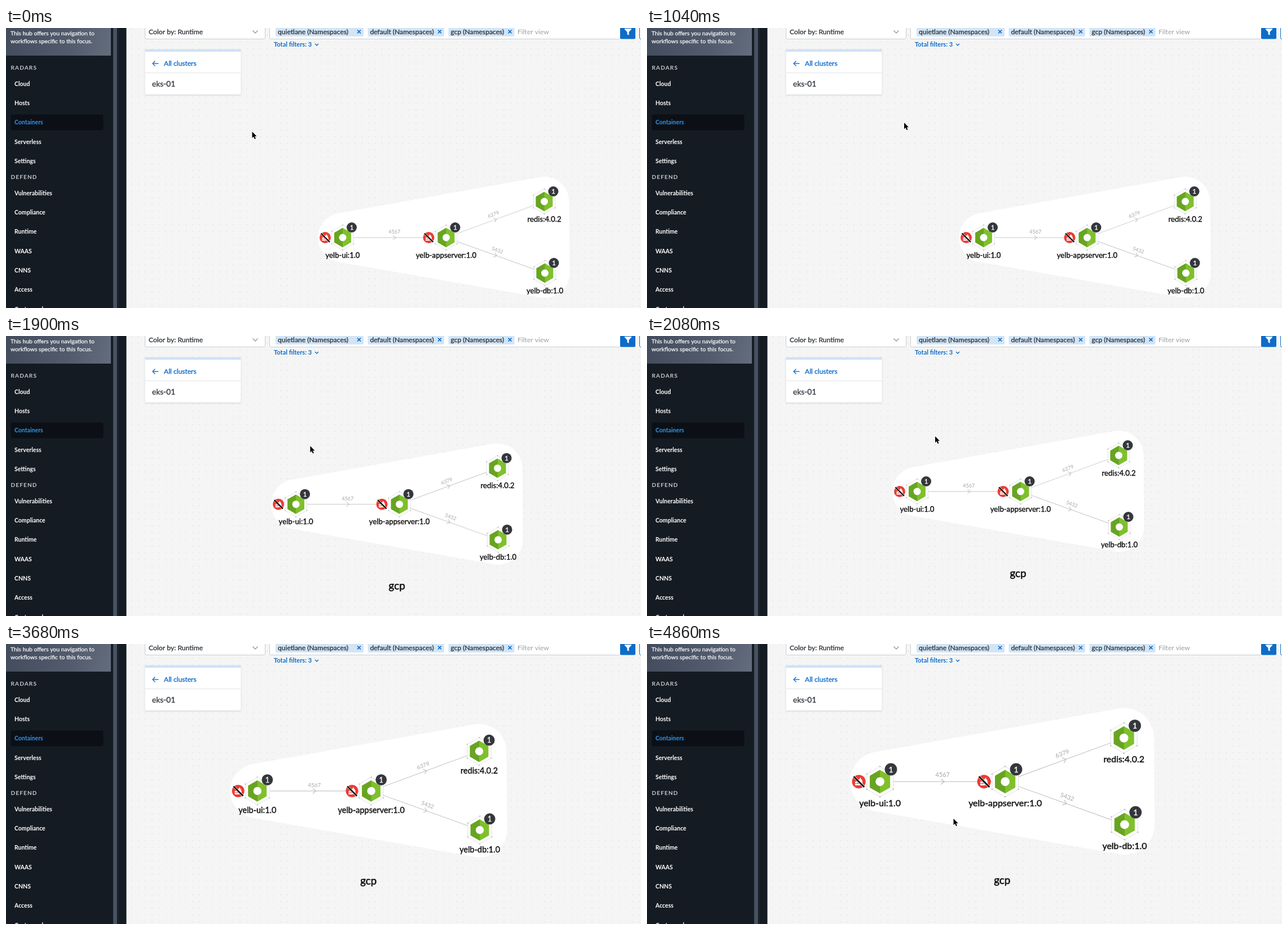
Write an HTML page with a canvas that moves like this. It is 1126x497 px and loops after 4.88 s.

```html
<!DOCTYPE html>
<html lang="en">
<head>
<meta charset="utf-8">
<title>Container radar</title>
<style>
  html, body { margin: 0; width: 100%; height: 100%; overflow: hidden; }
  canvas {
    display: block;
    background: radial-gradient(circle at 6px 6px, #e8eaea .8px, transparent 1.2px) 1px 7px / 12px 12px #f4f5f4;
  }
</style>
</head>
<body>
<canvas id="stage" width="1126" height="497"></canvas>
<script>
const ctx = document.getElementById('stage').getContext('2d');
const LOOP = 4880, TICK = 57.8;
const BLUE = '#0d6cc9';
const MEDIUM = 500;
ctx.lineJoin = 'round';

const linear = p => p;
const smooth = p => p * p * (3 - 2 * p);
const out = p => 1 - (1 - p) ** 2;

// Keys: [tick, x, y, easing into this key]
const cursorKeys = [
  [0, 436.5, 184], [9, 658, 201, smooth], [10, 658, 201], [18, 456, 168, smooth],
  [20, 466, 175], [25, 628, 274, smooth], [28, 628, 274], [29, 602, 243],
  [30, 575, 217], [36, 511, 178, out], [37, 508, 178], [39, 508, 178],
  [43, 1111, 448, smooth], [76, 921, 448], [84, 543.5, 310, out],
];
const dragKeys = [
  [28, 0, 0], [29, -14, -20], [30, -39, -45], [36, -118, -96, out], [37, -121.5, -96],
];

function at(keys, tick) {
  const i = keys.findIndex(k => k[0] > tick);
  if (i === 0) return keys[0].slice(1, 3);
  if (i < 0) return keys[keys.length - 1].slice(1, 3);
  const [t0, x0, y0] = keys[i - 1], [t1, x1, y1, ease = linear] = keys[i];
  const p = ease((tick - t0) / (t1 - t0));
  return [x0 + (x1 - x0) * p, y0 + (y1 - y0) * p];
}

// y is the middle of the capitals; the medium weight is regular with a thin outline
function text(str, x, y, size, color, weight = 400, align = 'left', spacing = 0) {
  ctx.font = `${weight === MEDIUM ? 400 : weight} ${size}px Lato, sans-serif`;
  ctx.fillStyle = ctx.strokeStyle = color;
  ctx.textAlign = align;
  ctx.letterSpacing = spacing + 'px';
  const baseline = y + size * .36;
  ctx.fillText(str, x, baseline);
  if (weight === MEDIUM) {
    ctx.lineWidth = size * .03;
    ctx.strokeText(str, x, baseline);
  }
}

function rect(x, y, w, h, fill, border, radius = 0) {
  ctx.beginPath();
  ctx.roundRect(x, y, w, h, radius);
  ctx.fillStyle = fill;
  ctx.fill();
  if (border) stroke(border, 1);
}

function stroke(color, width) {
  ctx.strokeStyle = color;
  ctx.lineWidth = width;
  ctx.stroke();
}

function line(points, color, width = 1) {
  ctx.beginPath();
  points.forEach(p => ctx.lineTo(...p));
  stroke(color, width);
}

function disc(x, y, r, color) {
  ctx.beginPath();
  ctx.arc(x, y, r, 0, Math.PI * 2);
  ctx.fillStyle = color;
  ctx.fill();
}

function polygon(points, color) {
  ctx.beginPath();
  points.forEach(p => ctx.lineTo(...p));
  ctx.closePath();
  ctx.fillStyle = color;
  ctx.fill();
}

function drawSidebar() {
  rect(0, 0, 213.5, 497, '#151b23');
  rect(190, 0, 7, 497, '#465262');
  rect(199, 0, 1, 497, '#232b35');
  const sky = ctx.createLinearGradient(0, 0, 186, 49);
  sky.addColorStop(0, '#434c5d');
  sky.addColorStop(.6, '#525b6c');
  sky.addColorStop(1, '#646d7d');
  rect(0, 0, 186, 49, sky);
  text('This hub offers you navigation to', 8, 9.6, 10.35, '#f0f2f4', MEDIUM);
  text('workflows specific to this focus.', 8, 23.6, 10.35, '#f0f2f4', MEDIUM);

  rect(8.5, 153.5, 164, 28, '#0c1016', null, 3);
  const section = (title, y, items) => {
    text(title, 8.5, y, 10.1, '#c3c7cb', 700, 'left', 1.1);
    items.forEach((item, i) =>
      text(item, 15, y + 28.5 + i * 34.3, 10.5, item === 'Containers' ? '#3095ee' : '#fff', 700));
  };
  section('RADARS', 70.5, ['Cloud', 'Hosts', 'Containers', 'Serverless', 'Settings']);
  section('DEFEND', 264.5, ['Vulnerabilities', 'Compliance', 'Runtime', 'WAAS', 'CNNS', 'Access', 'Custom rules']);
}

function drawHeader() {
  rect(246.5, -9.5, 213, 29, '#fff', '#c9cdd1', 2);
  text('Color by: Runtime', 253, 6.5, 12.2, '#33383e', MEDIUM);
  line([[437.5, 4.5], [442, 9], [446.5, 4.5]], '#8d9298', 1.3);

  rect(467.5, -9.5, 622, 29, '#fff', '#c9cdd1', 2);
  const chip = (label, x, w) => {
    rect(x, -5, w, 20, '#d2e5f7', null, 2);
    text(label, x + 4, 6.5, 12.1, '#33383e', MEDIUM);
    const cx = x + w - 8;
    line([[cx - 3, 3.5], [cx + 3, 9.5]], BLUE, 1.7);
    line([[cx - 3, 9.5], [cx + 3, 3.5]], BLUE, 1.7);
  };
  chip('quietlane (Namespaces)', 478, 156);
  chip('default (Namespaces)', 641.5, 135.5);
  chip('gcp (Namespaces)', 784.5, 117);
  text('Filter view', 907, 6.5, 12.1, '#9a9ea3');

  rect(1089, -9, 27, 28.5, BLUE, null, 2);
  polygon([[1097, 1], [1109, 1], [1109, 2.5], [1104.5, 7], [1104.5, 13], [1101.5, 11], [1101.5, 7], [1097, 2.5]], '#fff');
  rect(1123.5, -9.5, 30, 29, '#fff', BLUE, 2);

  text('Total filters: 3', 475, 29.5, 11.1, BLUE, 700);
  line([[548, 28], [551, 31], [554, 28]], BLUE, 1.4);
}

function drawPanel() {
  ctx.shadowColor = 'rgba(0,0,0,.14)';
  ctx.shadowBlur = 3;
  ctx.shadowOffsetY = 1;
  rect(246.5, 38, 170, 80, '#fff', null, 2);
  ctx.shadowColor = 'transparent';
  rect(246.5, 38, 170, 4, '#cde1f5');
  rect(246.5, 79, 170, 1, '#e3e5e7');
  line([[270.5, 63], [260, 63]], BLUE, 1.4);
  line([[264.5, 58.5], [260, 63], [264.5, 67.5]], BLUE, 1.4);
  text('All clusters', 280, 63, 12.05, BLUE, MEDIUM);
  text('eks-01', 259, 99, 13.7, '#3c4147', MEDIUM);
}

const ui = [0, 0], app = [183.5, 0], redis = [357.5, -64], db = [358.5, 63];

function hexagon(r) {
  return Array.from({ length: 6 }, (_, i) => {
    const a = i * Math.PI / 3 - Math.PI / 2;
    return [r * Math.cos(a), r * Math.sin(a)];
  });
}

function drawEdge([x0, y0], [x1, y1], port) {
  const half = Math.hypot(x1 - x0, y1 - y0) / 2;
  ctx.save();
  ctx.translate((x0 + x1) / 2, (y0 + y1) / 2);
  ctx.rotate(Math.atan2(y1 - y0, x1 - x0));
  line([[20 - half, 0], [half - 20, 0]], '#c6c6c6');
  line([[-2.5, -4], [2.5, 0], [-2.5, 4]], '#bcbcbc');
  text(port, 0, -9.8, 9, '#a6a6a6', 400, 'center');
  ctx.restore();
}

function drawBlockedFirewall() {
  ctx.save();
  ctx.translate(-31, 0);
  disc(0, 0, 10, '#ee3b33');
  rect(-5.5, 0, 11, 5.5, '#fff');
  line([[-5.5, 2.8], [5.5, 2.8]], '#ee3b33', .8);
  line([[-1.5, 0], [-1.5, 2.8]], '#ee3b33', .8);
  line([[2, 2.8], [2, 5.5]], '#ee3b33', .8);
  polygon([[0, 0], [0, -3], [2.5, -6], [3.5, -3.5], [5, -2], [5, 0]], '#fff');
  line([[-7, -7], [7, 7]], '#fff', 3.4);
  line([[-7.5, -7.5], [8, 8]], '#111', 2.4);
  ctx.restore();
}

function drawNode([x, y], label, blocked) {
  ctx.save();
  ctx.translate(x, y);
  const ring = hexagon(22.3), body = hexagon(17.2);
  line([...ring, ring[0]], '#dedede', .8);
  ring.forEach(p => disc(...p, 1, '#b9b9b9'));
  polygon(body, '#7fc02c');
  polygon([body[0], body[5], body[4], body[3]], '#68a422');
  disc(0, 0, 6.5, '#fff');
  if (blocked) drawBlockedFirewall();
  disc(16, -18, 9, '#34373c');
  text('1', 16, -18, 11.5, '#fff', MEDIUM, 'center');
  text(label, 0, 31, 13.15, '#111', MEDIUM, 'center');
  ctx.restore();
}

function drawGroup(tick, zoom) {
  const [dx, dy] = at(dragKeys, tick);
  const cx = 772.5, cy = 427;
  const x = cx + (597 + dx - cx) * zoom, y = cy + (372 + dy - cy) * zoom;
  ctx.save();
  ctx.translate(x, y);
  ctx.scale(zoom, zoom);
  polygon([ui, redis, db], '#fff');
  stroke('#fff', 88);
  drawEdge(ui, app, '4567');
  drawEdge(app, redis, '6379');
  drawEdge(app, db, '5432');
  drawNode(ui, 'yelb-ui:1.0', true);
  drawNode(app, 'yelb-appserver:1.0', true);
  drawNode(redis, 'redis:4.0.2');
  drawNode(db, 'yelb-db:1.0');
  ctx.restore();
  text('gcp', x + 179 * zoom, y + 145 * zoom - (zoom - 1) * 4, 18.8, '#111', MEDIUM, 'center');
}

function drawCursor(tick) {
  if (tick > 43 && tick < 76) return;
  ctx.save();
  ctx.translate(...at(cursorKeys, tick));
  ctx.scale(.87, .87);
  polygon([[0, 0], [0, 13], [3, 10.3], [5.2, 15.2], [7.4, 14.2], [5.2, 9.5], [9.3, 9.5]], '#000');
  stroke('#fff', 1.8);
  ctx.fill();
  ctx.restore();
}

function draw(now) {
  const t = now % LOOP;
  const tick = Math.floor((t + 4) / TICK);
  const zoom = t < 3680 ? 1 : t < 3860 ? 1.1 : 1.21;
  ctx.clearRect(0, 0, 1126, 497);
  drawGroup(tick, zoom);
  drawSidebar();
  drawHeader();
  drawPanel();
  drawCursor(tick);
  requestAnimationFrame(() => draw(performance.now()));
}
draw(0);
</script>
</body>
</html>
```
